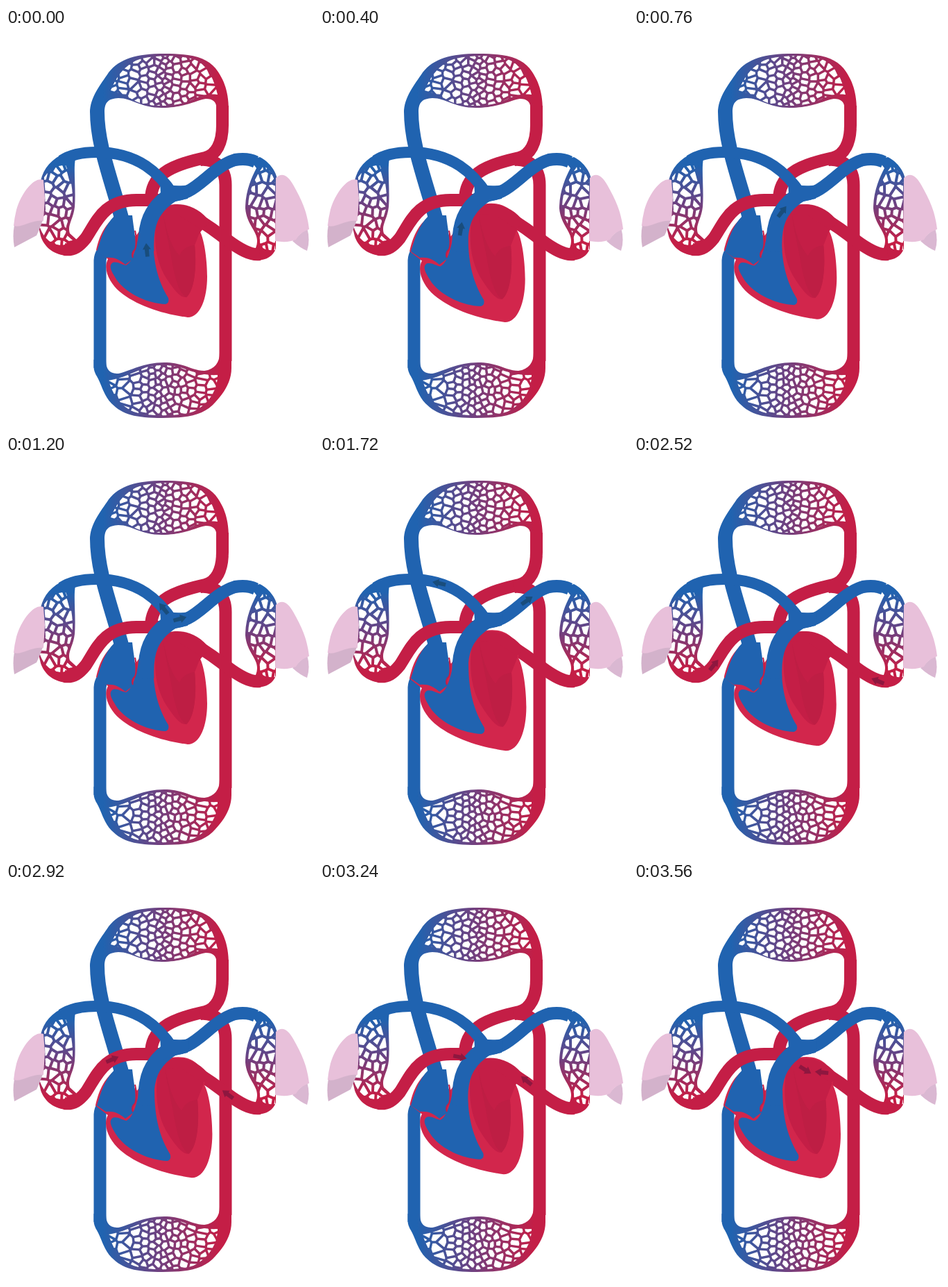
Animation of 444x575 px, one loop 3600 ms. Source, as an HTML page:

```html
<!DOCTYPE html>
<html lang="en">
<head>
<meta charset="utf-8">
<title>Blood circulation</title>
<style>
  html, body { margin: 0; width: 100%; height: 100%; overflow: hidden; background: #fff; }
  svg { display: block; }
  .vessel { fill: none; stroke-width: 18; }
  .blue { stroke: #2063b0; }
  .red { stroke: #c41e46; }
  .cells { fill: #fff; stroke: #fff; stroke-width: 1.2; stroke-linejoin: round; }
</style>
</head>
<body>
<svg width="444" height="575" viewBox="0 0 444 575">
  <defs>
    <linearGradient id="across" gradientUnits="userSpaceOnUse" x1="140" x2="308" y1="0" y2="0">
      <stop stop-color="#2063b0"/><stop offset=".5" stop-color="#74407e"/><stop offset="1" stop-color="#c41e46"/>
    </linearGradient>
    <linearGradient id="down" gradientUnits="userSpaceOnUse" x1="0" x2="0" y1="198" y2="308">
      <stop stop-color="#2063b0"/><stop offset=".5" stop-color="#6d4282"/><stop offset="1" stop-color="#c41e46"/>
    </linearGradient>
    <clipPath id="headMesh"><path d="M151 90C160 68 174 50 196 44C220 39 250 39 270 45C288 51 299 70 305 96C290 93 277 99 262 106C240 114 208 114 188 106C175 99 166 94 151 90Z"/></clipPath>
    <clipPath id="footMesh"><path d="M148 508C168 505 184 496 202 489C218 485 238 485 254 490C272 497 288 501 305 500C305 520 294 541 270 553C246 560 206 560 184 553C164 544 154 528 148 508Z"/></clipPath>
    <clipPath id="leftMesh"><path d="M55 215C63 203 76 197 86 198C94 216 98 238 95 260C92 276 84 284 87 298L96 306C82 320 55 312 48 284L57 262Z"/></clipPath>
    <clipPath id="rightMesh"><path d="M371 199C380 203 388 215 388 228V320C377 321 366 319 366 307C367 292 352 280 349 260C349 236 358 217 371 199Z"/></clipPath>
  </defs>

  <!-- systemic veins and capillary beds -->
  <path class="vessel blue" style="stroke-width:21" d="M131.500 119C131 170 153 220 171 290"/>
  <path class="vessel blue" d="M135.500 490V335Q136 322 150 312"/>
  <path fill="url(#across)" d="M121 122C121 100 136 82 148 64C164 44 188 37 228 37C268 37 288 42 302 58C312 71 321 88 321 118H303.500C304 107 299 102 288 102C272 105 256 115 225 115C193 115 182 101 162 101C148 102 142 106 142 122Z"/>
  <path fill="url(#across)" d="M126.500 478H144C144 493 150 498 162 498C180 494 198 482 228 482C256 482 268 494 286 494C301 492 308 482 308 468H325V490C325 508 316 524 302 539C286 557 266 562 226 562C186 562 168 557 152 541C140 528 138 514 131 502Q126.500 495 126.500 488Z"/>
  <path fill="url(#down)" d="M50 220C54 202 66 188 86 180L100 189C97 202 101 235 99 258C97 276 88 284 92 296L103 306C100 328 90 328 86 328C66 326 54 313 50 300L45 279L55 262Z"/>
  <path fill="url(#down)" d="M352 190L366 186C382 194 392 211 391 222L389 240V318Q383 334 362 335L360 317Q362 312 362 308C363 293 347 284 345 260C345 236 354 215 361 202Z"/>
  <g class="cells">
    <g clip-path="url(#headMesh)"><path id="head"/></g>
    <g clip-path="url(#footMesh)"><path id="foot"/></g>
    <g clip-path="url(#leftMesh)"><path id="left"/></g>
    <g clip-path="url(#rightMesh)"><path id="right"/></g>
  </g>

  <!-- arteries and pulmonary veins -->
  <g class="vessel red">
    <path d="M209 252C207 212 236 198 287 187C303 183 312 166 312 140V112"/>
    <path d="M280 190C304 188 316.500 204 316.500 226V480"/>
    <path d="M84 319C98 321 106 314 115 303C130 281 140 248 188 248H222"/>
    <path d="M366 326C352 328 336 318 321 307C305 296 293 284 265 270"/>
  </g>

  <!-- heart -->
  <path id="muscle" fill="#d2264c" d="M130 320C134 302 141 284 158 272L187 300L200 282L232 256C258 250 282 265 279 292C287 306 290 340 290 358C290 390 280 417 262 417C225 412 188 400 164 380C150 368 139 348 147 333Z"/>
  <path fill="#c41e46" d="M228 257C256 249 277 258 294 279L282 292L258 322L228 310L217 270Z"/>
  <g id="chambers">
    <path fill="#c41e46" d="M218 268C212 300 214 335 232 362C244 380 252 389 260 388C272 378 275 340 272 313L281 290L250 270Z"/>
    <path fill="#be1e44" d="M227 270C232 295 238 315 250 328C254 318 262 314 272 313C275 345 272 378 260 388C250 383 244 362 240 340C236 315 230 294 227 270Z"/>
    <path fill="#2063b0" d="M191 300H212C212 340 220 366 234 389Q236 396 230 398C205 397 176 384 161 365C154 354 146 343 154 338C161 336 166 341 173 342C182 338 187 320 191 300Z"/>
  </g>
  <path fill="#2063b0" d="M157 270L182 270C184 290 188 305 186 319Q180 325 184 332L172 341C163 333 155 330 144 331L131 322C137 304 141 286 157 270Z"/>
  <path fill="none" stroke="#c41e46" stroke-width="2" d="M186 292Q190 309 186 319Q180 324 183 331"/>

  <!-- pulmonary artery -->
  <g class="vessel blue">
    <path style="stroke-width:23" d="M202 322C200 284 208 259 240 239"/>
    <path d="M241 240C222 211 192 179 130 179C108 179 92 183 80 191" style="stroke-width:16"/>
    <path d="M230 240C272 248 291 202 330 190Q348 187 360 193"/>
  </g>
  <path fill="#2063b0" d="M222 222Q241 230 264 226L262 246Q240 250 224 257Z"/>

  <!-- lungs -->
  <path fill="#d3b2cb" d="M12 284L38 272L53 277Q48 291 44 299L12 316Q9 300 12 284Z"/>
  <path fill="#e8c0da" d="M54 219C40 213 21 240 15 262Q12 274 11 285C22 289 36 276 54 278L56 245Z"/>
  <path fill="#dab8d2" d="M413 307L434 288Q439 306 434 321Q424 317 413 307Z"/>
  <path fill="#e8c0da" d="M389 216C398 207 407 213 414 226C427 249 434 265 437 290Q424 294 418 305Q406 310 388 307Z"/>

  <g id="arrows"></g>
</svg>
<script>
const LOOP = 3600, STEP = 40;
const $ = id => document.getElementById(id);

function add(parent, tag, attrs) {
  const el = document.createElementNS('http://www.w3.org/2000/svg', tag);
  for (const key in attrs) el.setAttribute(key, attrs[key]);
  return parent.appendChild(el);
}

function random(seed) {
  return () => (seed = seed * 16807 % 2147483647) / 2147483647;
}

// Keep the part of a polygon behind the line through m with normal n.
function cut(poly, m, n) {
  const side = p => (p[0] - m[0]) * n[0] + (p[1] - m[1]) * n[1];
  return poly.flatMap((p, i) => {
    const q = poly[(i + 1) % poly.length], a = side(p), b = side(q), k = a / (a - b);
    const out = a <= 0 ? [p] : [];
    if (a * b < 0) out.push([p[0] + k * (q[0] - p[0]), p[1] + k * (q[1] - p[1])]);
    return out;
  });
}

// Voronoi cells, shrunk so that the walls between them read as capillaries.
function mesh(id, { cx, cy, long, wide, cols, rows, dense, wall, upright, seed }) {
  const rnd = random(seed), seeds = [];
  for (let i = 0; i < cols; i++) for (let j = 0; j < rows; j++) {
    const s = (i + .5 + (rnd() - .5) * .75) / cols * 2 - 1;
    const r = (j + .5 + (i % 2 - .5) * .5 + (rnd() - .5) * .5) / rows * 2 - 1;
    const u = long * (dense * s + (1 - dense) * s ** 3), v = wide * r * (1 - .25 * s * s);
    seeds.push(upright ? [cx + v, cy + u] : [cx + u, cy + v]);
  }
  const cells = seeds.map(a => {
    let poly = [[-40, -40], [40, -40], [40, 40], [-40, 40]].map(c => [a[0] + c[0], a[1] + c[1]]);
    for (const b of seeds) {
      if (a === b) continue;
      const dx = b[0] - a[0], dy = b[1] - a[1], d = Math.hypot(dx, dy), n = [dx / d, dy / d];
      const reach = d / 2 - wall / 2 - .6;
      poly = cut(poly, [a[0] + n[0] * reach, a[1] + n[1] * reach], n);
    }
    return poly.length > 2 ? 'M' + poly.map(p => p.map(c => c.toFixed(1))).join('L') + 'Z' : '';
  });
  $(id).setAttribute('d', cells.join(''));
}

const flat = { cx: 228, long: 84, wide: 43, cols: 13, rows: 8, dense: .66, wall: 3.5 };
const upright = { cy: 257, long: 68, wide: 27, cols: 8, rows: 5, dense: .9, wall: 4, upright: true };
mesh('head', { ...flat, cy: 76, seed: 77 });
mesh('foot', { ...flat, cy: 522, seed: 1234 });
mesh('left', { ...upright, cx: 74, seed: 501 });
mesh('right', { ...upright, cx: 370, seed: 902 });

const DARK_BLUE = '#194d7c', DARK_RED = '#8e173f';
const routes = [
  [0, 1060, DARK_BLUE, 'M203 320C200 292 204 277 214 264L228 247'],
  [1060, 2220, DARK_BLUE, 'M238 236C222 212 200 187 160 183Q130 179 107 181'],
  [1060, 2220, DARK_BLUE, 'M236 238Q244 238 251 236C272 230 282 221 298 210C312 200 325 191 346 189'],
  [2220, LOOP, DARK_RED, 'M75 318C92 323 104 316 115 303C128 287 134 263 155 255C182 246 216 250 252 274'],
  [2220, LOOP, DARK_RED, 'M378 321Q364 330 352 326Q338 319 321 307C304 295 294 275 267 274']
].map(([from, to, fill, d]) => {
  const track = add($('arrows'), 'path', { d, fill: 'none' });
  const arrow = add($('arrows'), 'path', { d: 'M-9.500 -2.800L1 -3V-6L10 0L1 6V3L-9.500 2.800Z', fill });
  return { from, to, track, arrow, length: track.getTotalLength() };
});

function swell(id, kx, ky, beat) {
  $(id).setAttribute('transform',
    `translate(150 290) scale(${1 + kx * beat} ${1 + ky * beat}) translate(-150 -290)`);
}

function draw(now) {
  const t = Math.floor(now / STEP) * STEP % LOOP;
  const beat = t % 600 / 560;
  swell('muscle', .057, .078, beat);
  swell('chambers', .035, .04, beat);
  for (const { from, to, track, arrow, length } of routes) {
    const on = t >= from && t < to;
    arrow.style.display = on ? '' : 'none';
    if (!on) continue;
    const s = length * (t - from) / (to - from);
    const p = track.getPointAtLength(s);
    const a = track.getPointAtLength(Math.max(0, s - 3)), b = track.getPointAtLength(s + 3);
    const angle = Math.atan2(b.y - a.y, b.x - a.x) * 180 / Math.PI;
    arrow.setAttribute('transform', `translate(${p.x} ${p.y}) rotate(${angle})`);
  }
}

const start = performance.now();
function tick() {
  draw(performance.now() - start);
  requestAnimationFrame(tick);
}
tick();
</script>
</body>
</html>
```
